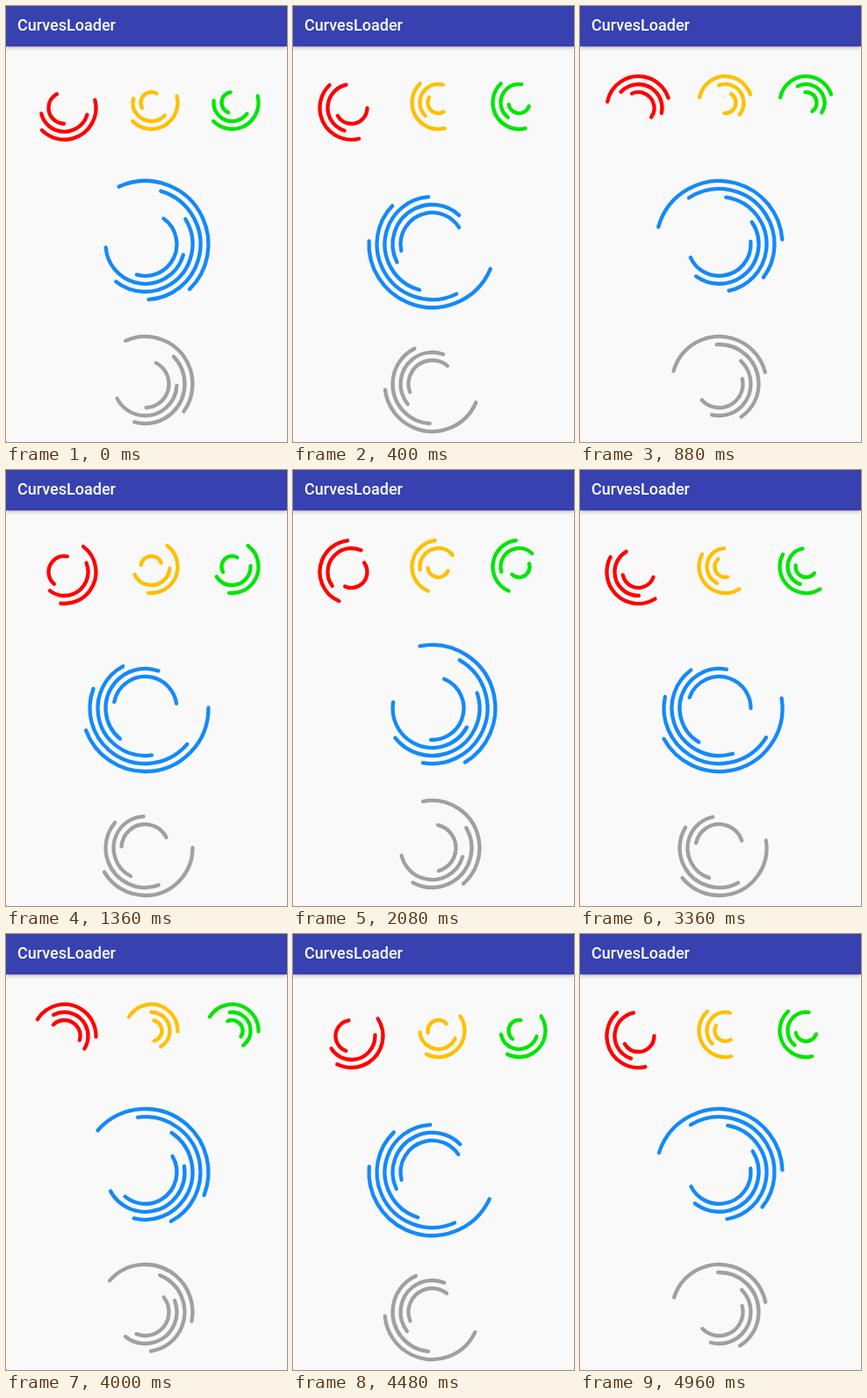
An HTML page with a canvas that plays this animation: 320x496 px, repeating every 5000 ms.

```html
<!DOCTYPE html>
<html lang="en">
<head>
<meta charset="utf-8">
<title>CurvesLoader</title>
<style>
  html, body { margin: 0; width: 320px; height: 496px; overflow: hidden; background: #f9f9f9; }
  canvas { display: block; }
  header {
    position: absolute; top: 0; left: 0; width: 307px; height: 46px; padding-left: 13px;
    background: #3742b0; color: #fff; box-shadow: 0 1px 4px rgba(0, 0, 0, .35);
    font: 500 18px/43px Roboto, sans-serif;
  }
</style>
</head>
<body>
<canvas id="stage" width="320" height="496"></canvas>
<header>CurvesLoader</header>
<script>
const LOOP = 5000;
const GAP = 9;
const ctx = document.getElementById('stage').getContext('2d');

// Each turn is linear, then rests briefly until the next restart.
const slow = { turn: 1500, restarts: [-1317, 204, 1731, 3240, 4760] };
const fast = { turn: 1000, restarts: [-828, 190, 1215, 2232, 3239, 4264] };

// Start angles run from the outermost curve inwards; the last curve turns backwards.
const loaders = [
  { x: 66.5, y: 116, radius: 36, color: '#ff0000', sweep: 150, pace: slow, starts: [29, 60, 48] },
  { x: 165.5, y: 110, radius: 30, color: '#ffbf00', sweep: 150, pace: slow, starts: [29, 87, 107] },
  { x: 257.5, y: 110, radius: 30, color: '#00e600', sweep: 150, pace: slow, starts: [29, 80, 67] },
  { x: 158.5, y: 271, radius: 72, color: '#1489fa', sweep: 160, pace: fast, starts: [-53, -12, 29.5, 77, -116] },
  { x: 158.5, y: 430, radius: 54, color: '#a0a0a0', sweep: 150, pace: fast, starts: [-53, 17.5, 64.5, -124] }
];

const rad = degrees => degrees * Math.PI / 180;

function rotation({ turn, restarts }, t) {
  const begun = restarts.filter(start => start <= t).pop();
  return 360 * Math.min((t - begun) / turn, 1);
}

function drawLoader({ x, y, radius, color, sweep, pace, starts }, t) {
  const turned = rotation(pace, t);
  ctx.strokeStyle = color;
  starts.forEach((start, i) => {
    const angle = start + (i === starts.length - 1 ? -turned : turned);
    ctx.beginPath();
    ctx.arc(x, y, radius - i * GAP, rad(angle), rad(angle + sweep));
    ctx.stroke();
  });
}

function draw(now) {
  ctx.clearRect(0, 0, 320, 496);
  ctx.lineWidth = 4.3;
  ctx.lineCap = 'round';
  loaders.forEach(loader => drawLoader(loader, now % LOOP));
  requestAnimationFrame(draw);
}
requestAnimationFrame(draw);
</script>
</body>
</html>
```
